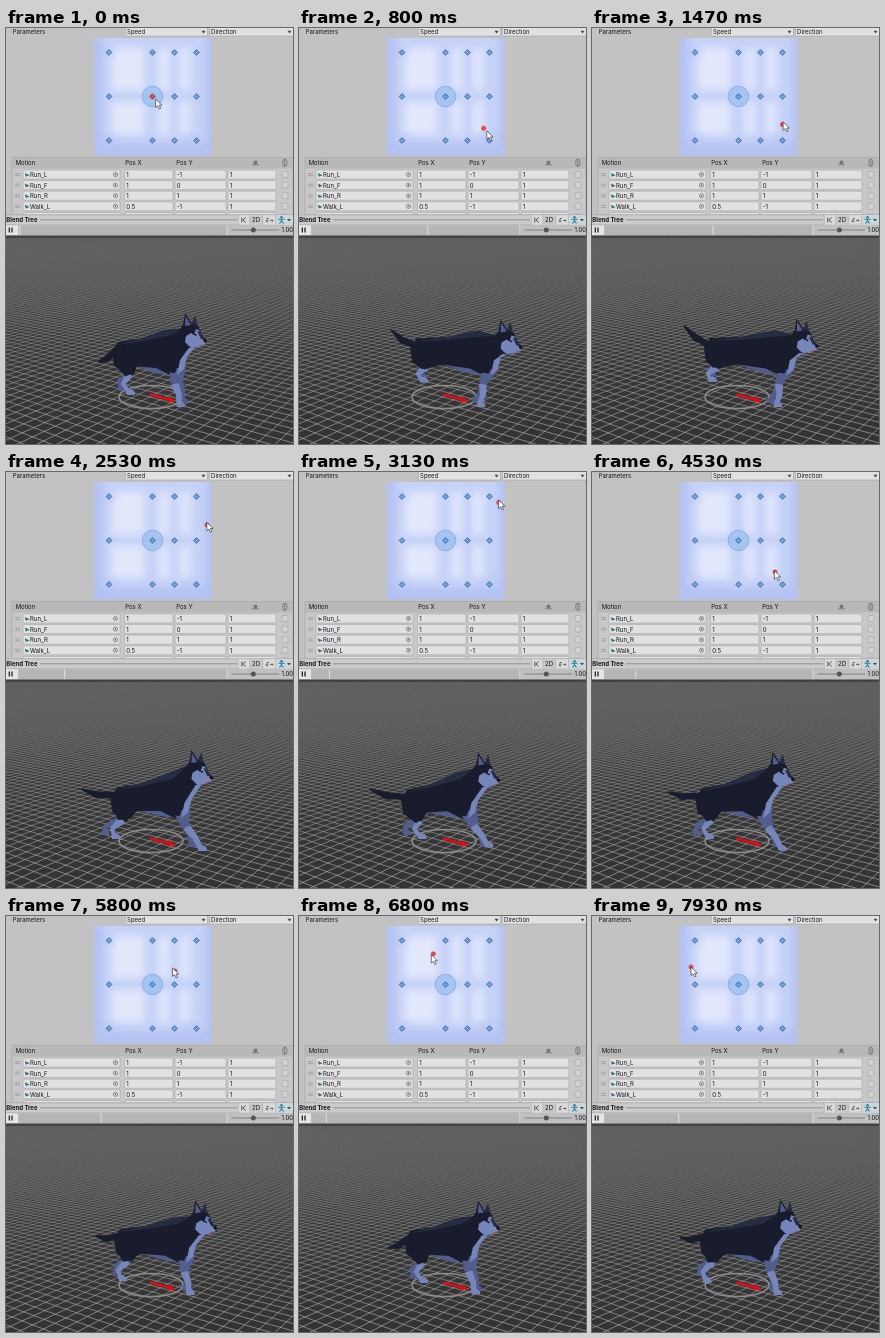
These frames come from a looping animation (287x416 px, 8000 ms). An HTML page:

```html
<!DOCTYPE html>
<html lang="en">
<head>
<meta charset="utf-8">
<title>Blend tree preview</title>
<style>
  html, body { margin: 0; width: 100%; height: 100%; overflow: hidden; background: #c2c2c2; }
  svg { display: block; width: 100vw; height: 100vh; }
  text { font: 6px Inter, Roboto, sans-serif; fill: #151515; }
  .bold { font-weight: 700; }
</style>
</head>
<body>
<svg id="stage" viewBox="0 0 287 416" preserveAspectRatio="none">
  <defs>
    <linearGradient id="ground" x1="0" y1="0" x2="0" y2="1">
      <stop offset="0" stop-color="#404040"/><stop offset="1" stop-color="#333"/>
    </linearGradient>
    <linearGradient id="lines" gradientUnits="userSpaceOnUse" x1="0" y1="207" x2="0" y2="416">
      <stop offset="0" stop-color="#999" stop-opacity=".06"/>
      <stop offset=".35" stop-color="#aaa" stop-opacity=".36"/>
      <stop offset="1" stop-color="#b4b4b4" stop-opacity=".75"/>
    </linearGradient>
    <filter id="soft" x="-50%" width="200%"><feGaussianBlur stdDeviation="4"/></filter>
    <clipPath id="mapClip"><rect x="88" y="10" width="117.500" height="117.500"/></clipPath>
    <clipPath id="viewClip"><rect y="207.500" width="287" height="209"/></clipPath>
    <clipPath id="listClip"><rect y="129" width="287" height="57.500"/></clipPath>
  </defs>
</svg>
<script>
const stage = document.getElementById('stage');
const LOOP = 8000, STEP = 200 / 3;

function add(tag, attrs = {}, parent = stage) {
  const node = document.createElementNS('http://www.w3.org/2000/svg', tag);
  for (const k in attrs) node.setAttribute(k, attrs[k]);
  parent.appendChild(node);
  return node;
}
const rect = (x, y, width, height, fill, parent, extra) =>
  add('rect', { x, y, width, height, fill, ...extra }, parent);
const circle = (cx, cy, r, fill, parent, extra) => add('circle', { cx, cy, r, fill, ...extra }, parent);
const path = (d, fill, parent, extra) => add('path', { d, fill, ...extra }, parent);
const stroke = (d, color, width, parent) =>
  path(d, 'none', parent, { stroke: color, 'stroke-width': width });
function label(x, y, text, parent, cls = '') {
  add('text', { x, y, class: cls }, parent).textContent = text;
}
const field = (x, y, w, h, parent) =>
  rect(x, y, w, h, '#e1e1e1', parent, { rx: 1, stroke: '#a6a6a6', 'stroke-width': .6 });

// Parameter bar
rect(0, 0, 287, 187, '#c2c2c2');
label(6.7, 6.2, 'Parameters');
[[119.5, 82, 'Speed'], [203.5, 86, 'Direction']].forEach(([x, w, name]) => {
  field(x, -1, w, 9);
  label(x + 1.6, 6.2, name);
  const tip = Math.min(x + w - 4, 283.5);
  path(`M${tip - 2} 2.800h4l-2 2.600z`, '#444');
});

// Blend map
const map = add('g', { 'clip-path': 'url(#mapClip)' });
const glow = (x, y, w, h, fill, opacity) => rect(x, y, w, h, fill, map, { opacity, filter: 'url(#soft)' });
rect(88, 10, 118, 118, '#b3c2f2', map);
glow(96, 4, 104, 112, '#cfd9f9', .7);
for (const [x, w] of [[106, 32], [153, 10], [174, 10]])
  for (const [y, h] of [[20, 42], [74, 32]]) glow(x, y, w, h, '#eef0ff', .75);
for (const [x, y] of [[103, 24.5], [103, 112.5], [190.5, 112.5]]) glow(x - 12, y - 8, 18, 14, '#b3c2f2', .35);
circle(146.5, 68.5, 10.3, '#9fc2f0', map, { 'fill-opacity': .85, stroke: '#7ba3dc', 'stroke-width': .7 });
for (const x of [103, 146.5, 168.5, 190.5])
  for (const y of [24.5, 68.5, 112.5])
    path(`M${x} ${y - 2.8}l2.800 2.800l-2.800 2.800l-2.800 -2.800z`, '#74a3de', stage, { stroke: '#2f639f', 'stroke-width': .9 });
const dot = circle(0, 0, 2.2, '#ee4545', stage, { stroke: '#c8404a', 'stroke-width': .5 });
const pointer = path('M0 0v8.500l2 -1.800l1.500 3.200l1.500 -.700l-1.500 -3.100h2.800z', '#fff', stage, { stroke: '#222', 'stroke-width': .6 });

// Motion list
const list = add('g', { 'clip-path': 'url(#listClip)' });
rect(6, 129.5, 281, 58, '#c8c8c8', list, { stroke: '#a0a0a0', 'stroke-width': .6 });
rect(6, 130, 281, 10.5, '#b8b8b8', list);
[[9.7, 'Motion'], [119.2, 'Pos X'], [170.2, 'Pos Y']].forEach(([x, name]) => label(x, 137.3, name, list));
circle(249.5, 134.5, 2, '#777', list);
stroke('M246 136.800h7', '#666', .7, list);
rect(276.8, 131.3, 4, 7, 'none', list, { rx: 2, stroke: '#666', 'stroke-width': .7 });
stroke('M278.800 131v7.500', '#666', .7, list);
[['Run_L', '1', '-1'], ['Run_F', '1', '0'], ['Run_R', '1', '1'], ['Walk_L', '0.5', '-1'], ['', '', '']]
  .forEach(([name, px, py], i) => {
    const y = 142 + i * 10.6, base = y + 7;
    stroke(`M9 ${y + 3.6}h5M9 ${y + 5.6}h5`, '#888', .6, list);
    field(17, y, 97, 9, list);
    if (name) path(`M18.800 ${y + 3}l4.800 2.200l-3.800 1.600z`, '#2a7284', list);
    label(24, base, name, list);
    circle(109.5, y + 4.5, 2.1, 'none', list, { stroke: '#555', 'stroke-width': .6 });
    circle(109.5, y + 4.5, .8, '#555', list);
    [[118.5, 48.5, px], [169, 51, py], [222, 48, name && '1']].forEach(([x, w, v]) => {
      field(x, y, w, 9, list);
      label(x + 1.7, base, v, list);
    });
    rect(276, y + 1.5, 6, 6, '#d2d2d2', list, { rx: 1, stroke: '#a0a0a0', 'stroke-width': .6 });
  });

// Preview toolbar
rect(0, 186.5, 287, 10.5, '#cbcbcb');
stroke('M0 186.800H287M0 197H287', '#999', .6);
label(.3, 194.2, 'Blend Tree', stage, 'bold');
stroke('M34 191.800H231', '#8a8a8a', .9);
rect(232.5, 187.2, 54.5, 9.5, '#dadada');
rect(244, 187.2, 12.5, 9.5, '#c6c6c6');
rect(270, 187.2, 17, 9.5, '#cad6dc');
stroke('M232.300 187v10M243.700 187v10M256.700 187v10M269.500 187v10', '#a5a5a5', .5);
stroke('M235.800 189.500v5M239.800 189.500l-3 2.500l3 2.500', '#333', .8);
label(246, 194.2, '2D');
stroke('M261 194.500v-4h2M259.500 193h3M264 192.500h3l-1.200 -1.200M267 192.500l-1.200 1.200', '#444', .7);
circle(275.5, 189.3, 1.2, '#237c94');
stroke('M272.500 191.300h6M275.500 191v2l-2 2.500M275.500 193l2 2.500', '#237c94', 1.1);
path('M281 191h4l-2 2.200z', '#444');
rect(0, 197.2, 287, 10.3, '#c0c0c0');
rect(0, 197.4, 12, 9.8, '#e5e5e5');
stroke('M3.300 199.500v5M6 199.500v5', '#222', 1.3);
rect(12.5, 197.4, 208, 9.8, '#b5b5b5');
stroke('M220.800 197v10.500', '#dadada', .8);
stroke('M225.500 202H273', '#777', .9);
circle(247.3, 202, 2.5, '#555');
label(275.5, 204.3, '1.00');
const scrub = stroke('M0 197.400v9.800', '#dedede', 1);

// Ground grid in perspective
const view = add('g', { 'clip-path': 'url(#viewClip)' });
rect(0, 207, 287, 209, 'url(#ground)', view);
const YAW = Math.PI / 5, CELL = 13;
const project = (u, v) => {
  const z = 1 - v / 540;
  return `${(143.5 + u / z).toFixed(1)} ${(169 + 200 / z).toFixed(1)}`;
};
for (const angle of [YAW, YAW - Math.PI / 2]) {
  const c = Math.cos(angle), s = Math.sin(angle);
  let d = '';
  for (let i = -170; i <= 170; i++) {
    const at = v => project(c * (v - c * i * CELL) / s - s * i * CELL, v);
    d += `M${at(-2100)}L${at(125)}`;
  }
  stroke(d, 'url(#lines)', .85, view);
}
add('ellipse', { cx: 145, cy: 369, rx: 32, ry: 11.500, fill: 'none', stroke: '#8c8c8c', 'stroke-width': 1.6 }, view);
stroke('M144 366.500L165 372', '#e30c14', 2.6, view);
path('M163 368.500l7 4.700l-8 1.300z', '#e30c14', view);

// Key points: time, then value
const drag = [
  [0, 146.5, 68.5], [870, 188, 103], [1470, 190.5, 96.5], [2530, 201, 53], [3470, 199, 18],
  [3730, 199, 36.5], [4530, 183, 100], [5200, 177, 88], [5800, 169, 55], [6300, 150, 32], [7930, 99, 51]
];
const cycles = [[0, 0], [870, .6], [1470, 1.52], [2530, 3.21], [3730, 4.94], [4530, 6.14], [5800, 7.39], [7300, 8.4], [8000, 9.45]];

function sample(keys, t) {
  const i = Math.max(1, keys.findIndex(k => k[0] >= t));
  const b = t > keys.at(-1)[0] ? keys.at(-1) : keys[i], a = keys[i - 1];
  const k = Math.min(1, (t - a[0]) / (b[0] - a[0]));
  return a.slice(1).map((v, n) => v + (b[n + 1] - v) * k);
}
const wave = (phase, peak) => Math.cos(2 * Math.PI * (phase - peak));

// Stride: a foot is lifted while it travels forward, planted while it goes back.
function foot(x, ground, phase, peak, reach, lift) {
  return [x + reach * wave(phase, peak), ground - lift * Math.max(0, wave(phase, peak - .25))];
}
// Gallop pose from the cycle phase and the amount of running, 0 to 1.
function gallop(phase, run) {
  const stretch = run * wave(phase, .55), rise = run * wave(phase, .2);
  const hip = [110 + run + 5 * stretch, 315 - 4 * stretch];
  const neck = [160 + 11 * run + 13 * stretch, 304 - rise];
  return {
    hip, neck,
    face: [184 + 13 * run + 13 * stretch, 305 + 2 * run - 9 * rise],
    tip: [92 - 11 * run + 11 * stretch, 334 - 17 * run - 20 * Math.max(0, stretch)],
    foreN: foot(neck[0] + 13, 377, phase, .15, 19 * run, 8 * run),
    foreF: foot(neck[0] + 16 - 7 * run, 373, phase, .09, 17 * run, 8 * run),
    hindN: foot(hip[0] + 13, 365, phase, .85, 20 * run, 15 * run),
    hindF: foot(hip[0] + 5, 361, phase, .79, 18 * run, 15 * run)
  };
}

// Dog
const NAVY = '#181c2c', DARK = '#121522', SLATE = '#262c42', PALE = '#7686bb', SHADE = '#515d8d';
const dog = add('g', {}, view);
const shape = fill => add('polygon', { fill }, dog);
const put = (node, pts) => node.setAttribute('points', pts.map(p => p.map(n => n.toFixed(1)).join()).join(' '));
const off = (p, x, y) => [p[0] + x, p[1] + y];
const mix = (a, b, k, x = 0, y = 0) => [a[0] + (b[0] - a[0]) * k + x, a[1] + (b[1] - a[1]) * k + y];

function taper(pts, widths) {
  const left = [], right = [];
  pts.forEach((p, i) => {
    const a = pts[Math.max(0, i - 1)], b = pts[Math.min(pts.length - 1, i + 1)];
    const dx = b[0] - a[0], dy = b[1] - a[1], k = widths[i] / 2 / (Math.hypot(dx, dy) || 1);
    left.push(off(p, -dy * k, dx * k));
    right.unshift(off(p, dy * k, -dx * k));
  });
  return left.concat(right);
}
function makeLeg(hind, upperFill, lowerFill) {
  const lower = shape(lowerFill), paw = shape(lowerFill), upper = shape(upperFill);
  return (root, end) => {
    const knee = mix(root, end, .42, hind ? 4 : -2), hock = mix(root, end, .72, hind ? -4 : 1);
    put(lower, taper([knee, hock, end], hind ? [8, 5, 4.5] : [8, 6, 5]));
    put(paw, [off(end, -3, -1), off(end, 2, -4), off(end, 6, -1), off(end, 6, 2), off(end, -2, 2)]);
    put(upper, taper([root, knee], hind ? [18, 9] : [12, 8]));
  };
}
const farHind = makeLeg(true, DARK, SHADE), farFore = makeLeg(false, SHADE, SHADE);
const tail = shape(NAVY);
const nearHind = makeLeg(true, NAVY, PALE);
const body = shape(NAVY), back = shape(SLATE), belly = shape(SHADE);
const nearFore = makeLeg(false, SHADE, PALE);
const shoulder = shape(NAVY), chest = shape(PALE);
const head = [
  [SLATE, 'M1 -8L5 -18L8 -5z'],
  [NAVY, 'M-11 -3L-7 -8L-5 -20L2 -9L8 -7L11 -1L9 8L0 15L-10 12z'],
  [SHADE, 'M-5 -7L-4.500 -17L1 -8z'],
  [PALE, 'M-4 3L1 0L4 2L6 -4L9 -3L11 2L16 7L15 11L8 14L0 14L-5 9z'],
  [SLATE, 'M7 -2L10 -1L16 7L11 6z'],
  [DARK, 'M14 5L17 7L16 10L13 8zM3 1H7L6 3z'],
  ['#a94b62', 'M8 13L14 11L10 14z']
].reduce((g, [fill, d]) => (path(d, fill, g), g), add('g', {}, dog));

function drawDog({ hip, neck, face, tip, foreN, foreF, hindN, hindF }) {
  farHind(off(hip, 13, 20), hindF);
  farFore(off(neck, 14, 34), foreF);
  nearHind(off(hip, 7, 18), hindN);
  nearFore(off(neck, 9, 36), foreN);
  const root = off(hip, 1, 6);
  put(tail, taper([tip, mix(tip, root, .45, 0, 3), root], [1.5, 7, 6]));
  put(body, [
    off(hip, -4, 9), off(hip, 2, -1), mix(hip, neck, .5, 0, 1), off(neck, -2, -2), off(face, -10, -4),
    off(face, 1, 12), off(neck, 20, 23), off(neck, 17, 36), off(neck, 6, 43), off(neck, -12, 40),
    mix(hip, neck, .42, 0, 28), off(hip, 10, 30), off(hip, -2, 23)
  ]);
  put(back, [off(hip, 0, 2), mix(hip, neck, .5, 0, 1), off(neck, -2, -2), off(face, -10, -3),
    off(neck, 2, 4), mix(hip, neck, .5, 0, 4)]);
  put(belly, [mix(hip, neck, .42, 0, 28), off(neck, -10, 36), off(neck, 4, 43), off(neck, -10, 41)]);
  put(shoulder, [off(neck, -4, 10), off(neck, 10, 14), off(neck, 14, 28), off(neck, 9, 41), off(neck, 0, 40), off(neck, -7, 26)]);
  put(chest, [off(face, 1, 12), off(face, 6, 13), off(neck, 21, 25), off(neck, 18, 37), off(neck, 11, 43), off(neck, 14, 28)]);
  head.setAttribute('transform', `translate(${face})`);
}

function draw(now) {
  const t = Math.floor((now % LOOP) / STEP + .06) * STEP % LOOP;
  const at = sample(drag, t), [phase] = sample(cycles, t);
  const speed = (at[0] - 146.5) / 44;
  dot.setAttribute('transform', `translate(${at})`);
  pointer.setAttribute('transform', `translate(${sample(drag, t + STEP)})`);
  scrub.setAttribute('transform', `translate(${14 + 208 * (phase % 1)} 0)`);
  drawDog(gallop(phase, Math.min(1, Math.max(speed, -speed / 2))));
}
const start = performance.now();
function tick() {
  draw(performance.now() - start);
  requestAnimationFrame(tick);
}
tick();
</script>
</body>
</html>
```
